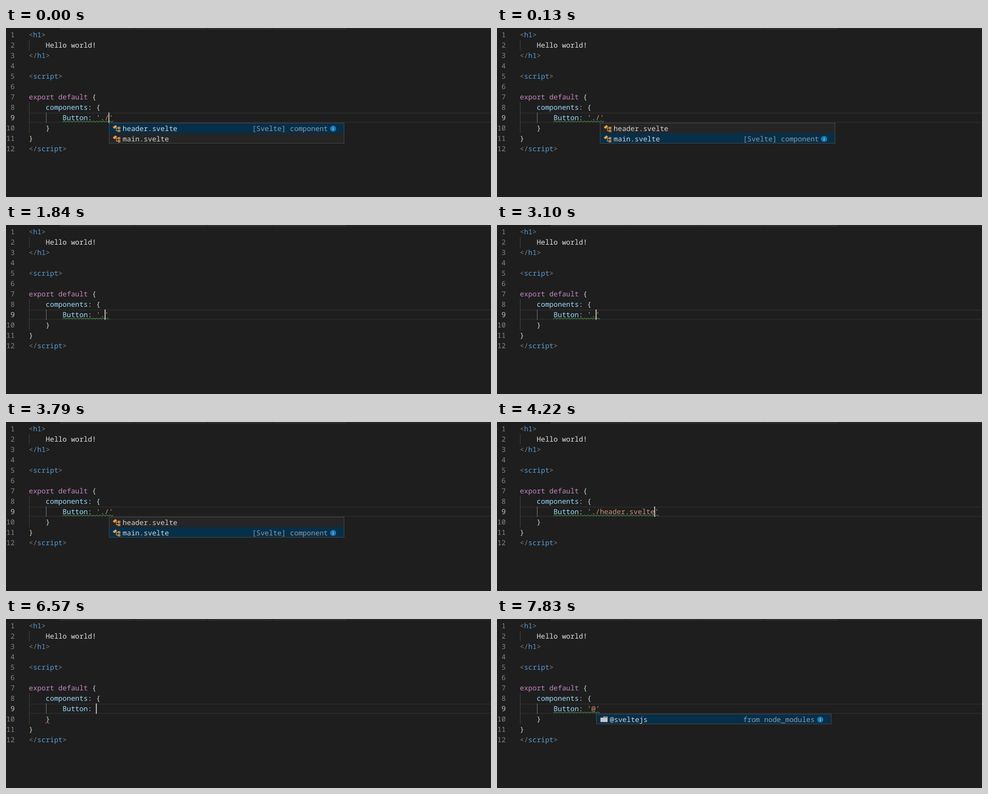
Write an HTML page with a canvas that moves like this. It is 886x310 px and loops after 8000 ms.

```html
<!DOCTYPE html>
<html lang="en">
<head>
<meta charset="utf-8">
<title>Editor completion</title>
<style>
html, body { margin: 0; width: 886px; height: 310px; overflow: hidden; background: #1e1e1e; }
canvas { display: block; }
</style>
</head>
<body>
<canvas id="stage" width="886" height="310"></canvas>
<script>
(() => {
const ctx = document.getElementById('stage').getContext('2d', { alpha: false });
const LOOP = 8000, LEFT = 41.7, CHAR = 7.697, ROW = 19;
const C = {
  bg: '#1e1e1e', punct: '#808080', tag: '#569cd6', text: '#d4d4d4', key: '#c586c0',
  prop: '#9cdcfe', str: '#ce9178', outer: '#ddd3b4', inner: '#c6dbe3',
  warn: '#4d9e4d', error: '#f44747'
};

const lists = {
  files: { x: 188, icon: drawClass, textX: 213, names: ['header.svelte', 'main.svelte'],
           detail: '[Svelte] component', infoX: 597.5 },
  modules: { x: 181, icon: drawFolder, textX: 206, names: ['@sveltejs'],
             detail: 'from node_modules', infoX: 590.5 }
};

// Each step changes only the listed parts of the state.
const steps = [
  [0, { value: "'./'", col: 19, caret: true, list: 'files', pick: 0, warn: true, error: null }],
  [30, { caret: false }],
  [130, { pick: 1 }],
  [510, { value: "'./main.svelte'", col: 30, caret: true, list: null }],
  [970, { caret: false }],
  [1200, { value: "'./main.'", col: 24, caret: true }],
  [1330, { value: "'./main'", col: 23 }],
  [1480, { value: "'./'", col: 19 }],
  [1840, { value: "'.'", col: 18 }],
  [1990, { value: "''", col: 17 }],
  [2140, { value: '', col: 16 }],
  [2220, { warn: false, error: [10, 4] }],
  [2400, { value: "''", col: 17 }],
  [2460, { warn: true, error: null }],
  [2920, { caret: false }],
  [3100, { value: "'.'", col: 18, caret: true }],
  [3330, { value: "'./'", col: 19, list: 'files', pick: 1 }],
  [3790, { caret: false }],
  [3990, { pick: 0 }],
  [4220, { value: "'./header.svelte'", col: 32, caret: true, list: null }],
  [4680, { caret: false }],
  [4910, { value: "'./header.'", col: 26, caret: true }],
  [5030, { value: "'./header'", col: 25 }],
  [5140, { value: "'./'", col: 19 }],
  [5320, { value: "'", col: 16 }],
  [5420, { warn: false, error: [9, 16] }],
  [5780, { caret: false }],
  [6290, { caret: true }],
  [6520, { value: '', error: null }],
  [6570, { error: [10, 4] }],
  [6850, { value: "''", col: 17 }],
  [6950, { warn: true, error: null }],
  [7310, { value: "'@'", col: 18 }],
  [7370, { list: 'modules', pick: 0 }],
  [7830, { caret: false }]
];

const stateAt = t => Object.assign({}, ...steps.filter(s => s[0] <= t).map(s => s[1]));
const rowY = line => 3 + ROW * (line - 1);
const colX = col => LEFT + CHAR * col;

function rect(x, y, w, h, color) {
  ctx.fillStyle = color;
  ctx.fillRect(x, y, w, h);
}

function write(str, x, y, color) {
  ctx.fillStyle = color;
  ctx.fillText(str, x, y);
}

// Parts alternate text and colour.
function code(line, col, ...parts) {
  for (let i = 0; i < parts.length; i += 2) {
    write(parts[i], colX(col), rowY(line) + 14, parts[i + 1]);
    col += parts[i].length;
  }
}

function squiggle(line, from, to, color) {
  const x0 = Math.round(colX(from)), x1 = Math.round(colX(to)), y = rowY(line) + 15.5;
  ctx.save();
  ctx.beginPath();
  ctx.rect(x0, y - 1, x1 - x0, 4);
  ctx.clip();
  ctx.beginPath();
  ctx.moveTo(x0, y + 2);
  for (let x = x0, i = 0; x <= x1 + 3; x += 3, i++) ctx.lineTo(x, y + (i % 2 ? 0 : 2));
  ctx.strokeStyle = color;
  ctx.lineWidth = 1;
  ctx.stroke();
  ctx.restore();
}

function drawClass(x, y) {
  const orange = '#e8a24f';
  ctx.fillStyle = orange;
  ctx.beginPath();
  ctx.moveTo(x + 7, y + 8);
  ctx.lineTo(x + 12, y + 4);
  ctx.lineTo(x + 15, y + 7);
  ctx.lineTo(x + 10, y + 11);
  ctx.fill();
  rect(x + 13, y + 9, 4, 1, orange);
  rect(x + 13, y + 9, 1, 6, orange);
  rect(x + 13, y + 14, 4, 1, orange);
  ctx.strokeStyle = orange;
  ctx.lineWidth = 1.4;
  ctx.strokeRect(x + 17, y + 8, 3, 2.6);
  ctx.strokeRect(x + 17, y + 13.4, 3, 2.6);
}

function drawFolder(x, y) {
  rect(x + 13, y + 5, 8, 3, '#c5c5c5');
  rect(x + 8, y + 7, 13, 8, '#c5c5c5');
  rect(x + 14, y + 6, 6, 1, '#3b4650');
}

function drawInfo(x, y) {
  ctx.fillStyle = '#1d78b0';
  ctx.beginPath();
  ctx.arc(x, y, 5.6, 0, Math.PI * 2);
  ctx.fill();
  rect(x - 0.5, y - 3, 1, 1, '#d8e8f2');
  rect(x - 0.5, y - 1, 1, 4, '#d8e8f2');
}

function drawList({ x, icon, textX, names, detail, infoX }, pick) {
  const y = 174, h = ROW * names.length;
  rect(x, y, 430, h, '#454545');
  rect(x + 1, y + 1, 428, h - 2, '#252526');
  names.forEach((name, i) => {
    const ry = y + ROW * i;
    if (i === pick) {
      const y0 = Math.max(ry, y + 1), y1 = Math.min(ry + ROW, y + h - 1);
      rect(x + 1, y0, 428, y1 - y0, '#062f4a');
      write(detail, 449.5, ry + 15, '#8e9ba5');
      drawInfo(infoX, ry + 10.5);
    }
    icon(x, ry);
    write(name, textX, ry + 15, C.text);
  });
}

function drawFrame() {
  rect(0, 0, 886, 310, C.bg);
  rect(98, 0, 524, 3, '#2d2d2d');
  rect(622, 0, 264, 3, '#252526');
  for (const x of [235, 367, 487]) rect(x, 0, 1, 3, C.bg);
  rect(42, 155, 844, 2, '#282828');
  rect(42, 172, 844, 2, '#282828');
  rect(42, rowY(2), 1, ROW, '#404040');
  rect(42, rowY(8), 1, ROW * 3, '#404040');
  rect(73, rowY(9), 1, ROW, '#707070');
  ctx.textAlign = 'right';
  for (let n = 1; n <= 12; n++) write(n, 16, rowY(n) + 14, n === 9 ? '#c6c6c6' : '#858585');
  ctx.textAlign = 'left';
}

function draw(t) {
  const s = stateAt(t);
  const open = s.value === "'";
  drawFrame();

  code(1, 0, '<', C.punct, 'h1', C.tag, '>', C.punct);
  code(2, 4, 'Hello world!', '#e2e2e2');
  code(3, 0, '</', C.punct, 'h1', C.tag, '>', C.punct);
  code(5, 0, '<', C.punct, 'script', C.tag, '>', C.punct);
  code(7, 0, 'export default ', C.key, '{', C.text);
  code(8, 4, 'components:', C.prop, ' {', C.inner);
  code(9, 8, 'Button: ', C.prop, s.value, C.str);
  code(10, 4, '}', open ? C.str : C.inner);
  code(11, 0, '}', open ? C.inner : C.outer);
  // An unclosed string keeps the closing tag inside the script.
  const edge = open ? C.text : C.punct;
  code(12, 0, '</', edge, 'script', open ? C.prop : C.tag, '>', edge);

  if (s.warn) squiggle(9, 8, 16 + s.value.length, C.warn);
  if (s.error) squiggle(s.error[0], s.error[1], s.error[1] + 1, C.error);
  if (s.caret) rect(Math.floor(41.6 + CHAR * s.col), rowY(9), 2, ROW, '#aeafad');
  if (s.list) drawList(lists[s.list], s.pick);
}

ctx.font = '12.83px "Noto Sans Mono", "DejaVu Sans Mono", monospace';
ctx.textRendering = 'geometricPrecision';

const start = performance.now();
function tick() {
  draw((performance.now() - start) % LOOP);
  requestAnimationFrame(tick);
}
tick();
})();
</script>
</body>
</html>
```
